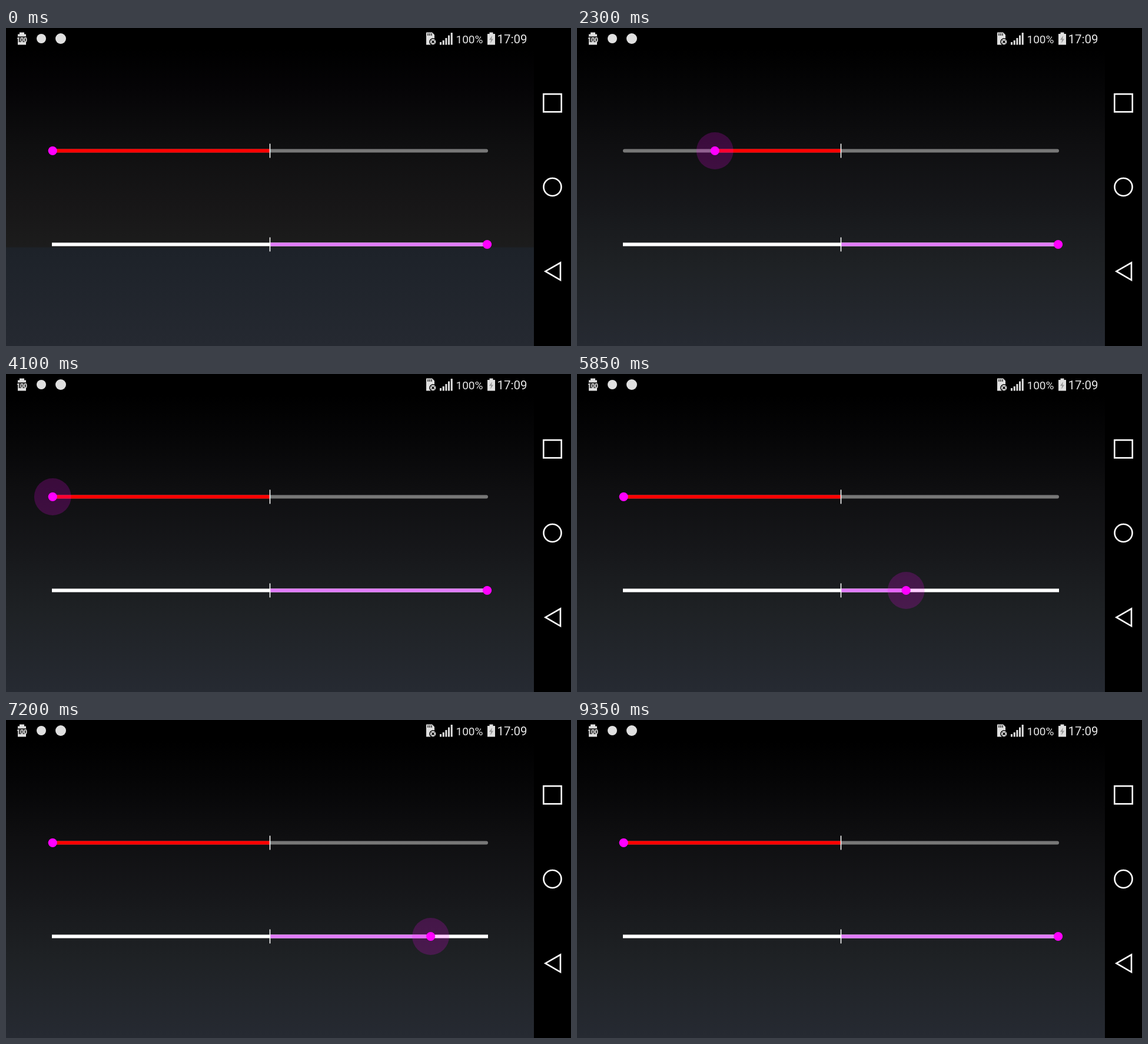
These frames come from a looping animation (960 px wide and 540 px high, 9.4 s). An HTML page:

```html
<!DOCTYPE html>
<html lang="en">
<head>
<meta charset="utf-8">
<title>Centred sliders</title>
<style>
  html, body { margin: 0; width: 100%; height: 100%; overflow: hidden; background: #000; }
  svg { display: block; width: 960px; height: 540px; }
  text { font-family: Roboto, sans-serif; fill: #e6e6e6; }
</style>
</head>
<body>
<svg viewBox="0 0 960 540">
  <defs>
    <linearGradient id="smooth" gradientUnits="userSpaceOnUse" x1="0" y1="36" x2="0" y2="540">
      <stop offset="0" stop-color="#000"/>
      <stop offset=".13" stop-color="#050506"/>
      <stop offset=".33" stop-color="#0f0f11"/>
      <stop offset=".52" stop-color="#16171a"/>
      <stop offset=".72" stop-color="#1e2124"/>
      <stop offset="1" stop-color="#262a32"/>
    </linearGradient>
    <linearGradient id="stepped" gradientUnits="userSpaceOnUse" x1="0" y1="36" x2="0" y2="540">
      <stop offset="0" stop-color="#000"/>
      <stop offset=".13" stop-color="#050406"/>
      <stop offset=".33" stop-color="#0f0f10"/>
      <stop offset=".52" stop-color="#171617"/>
      <stop offset=".665" stop-color="#1c1c1c"/>
      <stop offset=".67" stop-color="#1d2229"/>
      <stop offset="1" stop-color="#252931"/>
    </linearGradient>
  </defs>
  <rect width="960" height="540"/>
  <rect id="backdrop" y="36" width="897" height="504"/>

  <g fill="#e0e0e0">
    <path d="M23 7.500h8v3h3v4H20v-4h3zM20 24h14v4.500H20z"/>
    <rect x="19" y="14.500" width="16" height="9.500" fill="#333"/>
    <text x="27" y="23.500" font-size="10.500" font-weight="700" text-anchor="middle">100</text>
    <circle cx="60" cy="18" r="8"/>
    <circle cx="93" cy="18" r="9"/>
    <path d="M714 7.500h10l4 4v17h-14z"/>
    <path d="M717 9v4M720 9v4M723 9v4" stroke="#111" stroke-width="1.300"/>
    <circle cx="725.500" cy="23.500" r="5.500" stroke="#000" stroke-width="1.500"/>
    <path d="M723.200 21.200l4.600 4.600m0-4.600l-4.600 4.600" stroke="#000" stroke-width="1.600"/>
    <path d="M737 24h3v4.500h-3zM741.700 21h3v7.500h-3zM746.400 17h3v11.500h-3zM751 12.500h3v16h-3zM755.700 8h3v20.500h-3z"/>
    <path d="M821.500 7.500h6v2.500h3.500v18.500h-13V10h3.500z"/>
    <path d="M826 13l-5 7h3l-1 6 5-7.500h-3z" fill="#999"/>
  </g>
  <text x="764.500" y="26" font-size="19">100%</text>
  <text x="834.500" y="26" font-size="20.500">17:09</text>

  <g fill="none" stroke="#fff" stroke-width="2.600">
    <rect x="913.300" y="112.200" width="30.400" height="30.200"/>
    <circle cx="928.500" cy="270" r="15"/>
    <path d="M942 398.500v29.500l-25.500-14.800z"/>
  </g>
  <g id="sliders"></g>
</svg>
<script>
const LOOP = 9400, TICK = 50;
const CENTRE = 448.4, UNIT = 7.383;

const sliders = [
  {
    y: 208.5, cap: 'round', track: '#777', negative: '#f00', positive: '#00f',
    pressed: [700, 4350],
    keys: [[650, -50], [1400, 43], [1520, 45], [1560, 45], [2470, -37], [2500, -37], [2550, -36],
           [3250, 37], [3340, 39], [3390, 39], [3500, 35], [4100, -50]]
  },
  {
    y: 367.5, cap: 'butt', track: '#fff', negative: '#c5adf8', positive: '#e27cfb',
    pressed: [5550, 9350],
    keys: [[5500, 50], [5550, 49], [5850, 15], [6400, -34], [6450, -34], [7200, 37], [7300, 40],
           [7400, 40], [8050, -44], [8250, -47], [8350, -47], [9050, 50]]
  }
];

function add(parent, tag, attrs) {
  const node = document.createElementNS('http://www.w3.org/2000/svg', tag);
  set(node, attrs);
  return parent.appendChild(node);
}

function set(node, attrs) {
  for (const name in attrs) node.setAttribute(name, attrs[name]);
}

function build(slider) {
  const { y, cap, track } = slider;
  const root = document.getElementById('sliders');
  const inset = cap === 'round' ? 3 : 0;
  add(root, 'path', { d: `M${78 + inset} ${y}H${819 - inset}`, stroke: track, 'stroke-width': 6, 'stroke-linecap': cap });
  slider.fill = add(root, 'path', { 'stroke-width': 6 });
  add(root, 'path', { d: `M448.5 ${y - 12}v24`, stroke: '#fff', 'stroke-width': 1.6 });
  slider.halo = add(root, 'circle', { cy: y, r: 31.4, fill: '#f0f', 'fill-opacity': 0.19 });
  slider.thumb = add(root, 'circle', { cy: y, r: 7.6, fill: '#f0f' });
}

// Monotone cubic interpolation: drags never overshoot their turning points.
function valueAt(keys, t) {
  const last = keys.length - 1;
  if (t <= keys[0][0]) return keys[0][1];
  if (t >= keys[last][0]) return keys[last][1];
  const secant = i => (keys[i + 1][1] - keys[i][1]) / (keys[i + 1][0] - keys[i][0]);
  const slope = i => {
    if (i === 0 || i === last) return 0;
    const a = secant(i - 1), b = secant(i);
    return a * b > 0 ? 2 * a * b / (a + b) : 0;
  };
  const i = keys.findIndex(key => key[0] > t) - 1;
  const [t0, v0] = keys[i], [t1, v1] = keys[i + 1];
  const span = t1 - t0, u = (t - t0) / span, w = 1 - u;
  return v0 * (1 + 2 * u) * w * w + v1 * (3 - 2 * u) * u * u
    + span * u * w * (slope(i) * w - slope(i + 1) * u);
}

function draw(slider, t) {
  const value = Math.round(valueAt(slider.keys, t));
  const x = CENTRE + value * UNIT;
  const [down, up] = slider.pressed;
  set(slider.fill, { d: `M${CENTRE} ${slider.y}H${x}`, stroke: value < 0 ? slider.negative : slider.positive });
  set(slider.halo, { cx: x, visibility: t >= down && t < up ? 'visible' : 'hidden' });
  set(slider.thumb, { cx: x });
}

function render(now) {
  const t = Math.floor(now % LOOP / TICK) * TICK;
  set(document.getElementById('backdrop'), { fill: `url(#${t < 700 ? 'stepped' : 'smooth'})` });
  sliders.forEach(slider => draw(slider, t));
}

function loop() {
  render(performance.now());
  requestAnimationFrame(loop);
}

sliders.forEach(build);
loop();
</script>
</body>
</html>
```
